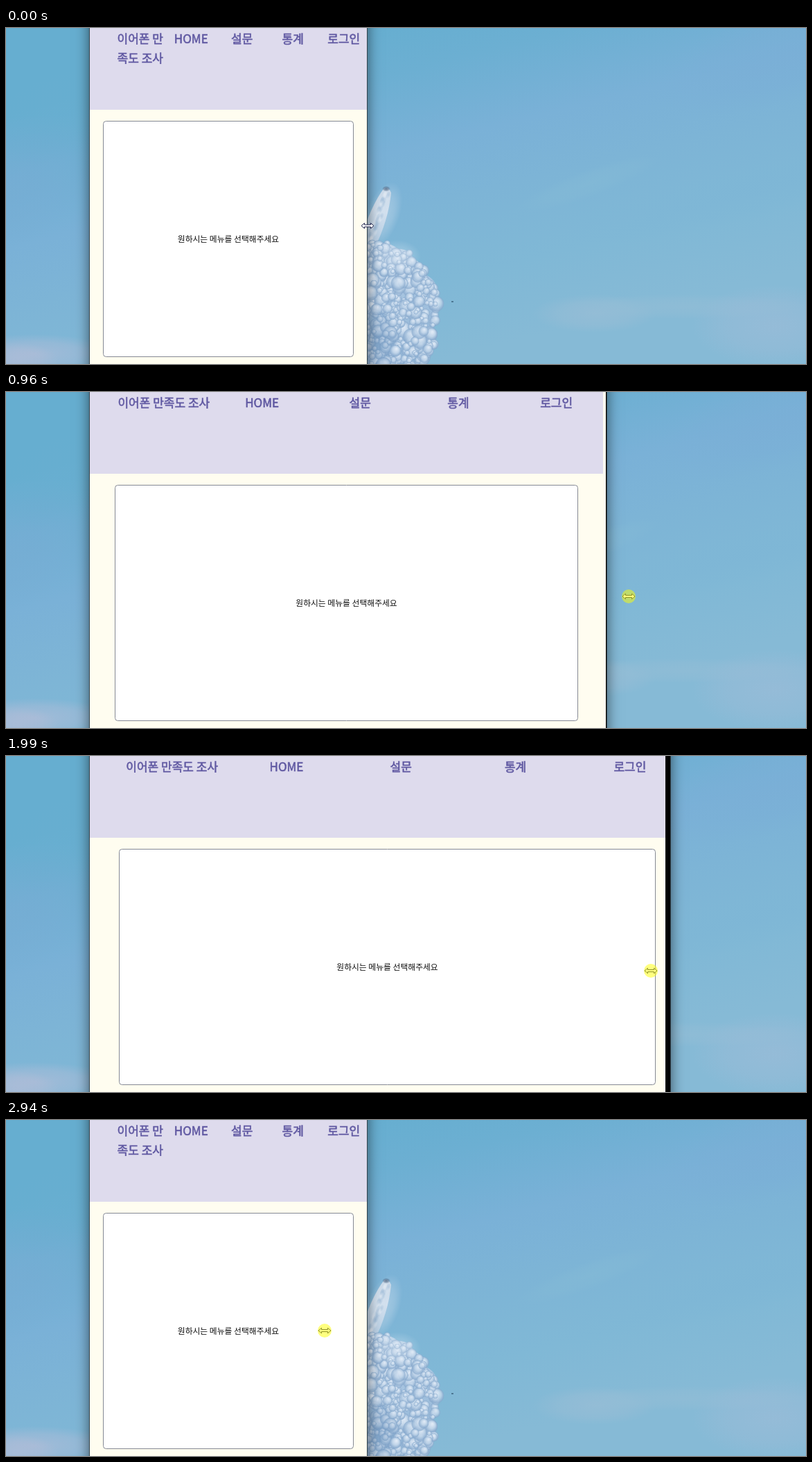
Recreate the animation shown at these times as an HTML page with a canvas. Size 1155x485 px, loop 3140 ms.

```html
<!DOCTYPE html>
<html lang="ko">
<head>
<meta charset="utf-8">
<title>Responsive window</title>
<style>
html, body { margin: 0; width: 100%; height: 100%; overflow: hidden; }
canvas { display: block; }
</style>
</head>
<body>
<canvas id="stage" width="1155" height="485"></canvas>
<script>
const WIDTH = 1155, HEIGHT = 485, LOOP = 3140, LEFT = 121;
const FONT = '"Noto Sans CJK KR", "Noto Sans KR", "Noto Sans CJK JP", "Noto Sans CJK", sans-serif';
const ctx = document.getElementById('stage').getContext('2d');

// time, pointer x, pointer y, window right, painted right, layout right
const KEYS = [
  [350, 524, 284, 523, 521, 521],
  [540, 597, 282, 580, 567, 562],
  [680, 696, 282, 677, 661, 655],
  [820, 778, 288, 757, 741, 733],
  [960, 899, 295, 868, 866, 862],
  [1170, 1015, 301, 1000, 992, 986],
  [1370, 1078, 305, 1059, 1057, 1054],
  [1580, 1100, 308, 1097, 1096, 1096],
  [1780, 1082, 309, 1090, 1082, 1096],
  [1990, 931, 310, 960, 952, 980],
  [2260, 722, 308, 738, 733, 761],
  [2460, 567, 306, 583, 580, 596],
  [2600, 503, 305, 522, 521, 521],
  [2800, 462, 304, 522, 521, 521],
  [2940, 460, 304, 522, 521, 521]
];
const REST = [0, 522, 285.5, 522, 521, 521];

// The screen refreshes in short steps: first time, last time, count
const TICKS = [0, 200, 350];
[[470, 820, 6], [890, 1370, 8], [1440, 1580, 3], [1780, 2260, 8], [2330, 2800, 8], [2870, 2940, 2]]
  .forEach(([from, to, count]) => {
    for (let i = 0; i < count; i++) {
      TICKS.push(Math.round((from + (to - from) * i / (count - 1)) / 10) * 10);
    }
  });

function poseAt(tick) {
  if (tick < 350) return REST;
  const next = KEYS.findIndex(key => key[0] > tick);
  if (next < 0) return KEYS[KEYS.length - 1];
  const a = KEYS[next - 1], b = KEYS[next];
  const part = (tick - a[0]) / (b[0] - a[0]);
  return a.map((value, i) => Math.round(value + (b[i] - value) * part));
}

function randomFrom(seed) {
  return () => (seed = (seed * 16807) % 2147483647) / 2147483647;
}

function fillGradient(g, gradient, stops) {
  stops.forEach(([at, color]) => gradient.addColorStop(at, color));
  g.fillStyle = gradient;
}

function softEllipse(g, x, y, rx, ry, rgb, alpha, angle = 0) {
  g.save();
  g.translate(x, y);
  g.rotate(angle);
  g.scale(rx, ry);
  fillGradient(g, g.createRadialGradient(0, 0, 0, 0, 0, 1), [
    [0, `rgba(${rgb},${alpha})`], [0.6, `rgba(${rgb},${alpha * 0.6})`], [1, `rgba(${rgb},0)`]
  ]);
  g.fillRect(-1, -1, 2, 2);
  g.restore();
}

function drawSky(g) {
  fillGradient(g, g.createLinearGradient(500, 0, 620, 480), [
    [0, '#66aed0'], [0.16, '#6cafd2'], [0.38, '#7ab1d7'], [0.55, '#7db4d6'], [0.78, '#80b8d6'], [1, '#86bad6']
  ]);
  g.fillRect(0, 0, WIDTH, HEIGHT);
  softEllipse(g, 0, 225, 150, 90, '122,172,212', 0.6, -0.4);
  softEllipse(g, 70, 130, 110, 60, '104,174,208', 0.5, -0.4);
  softEllipse(g, 1120, 40, 190, 70, '122,174,214', 0.6, -0.3);
  softEllipse(g, 1060, 235, 260, 45, '126,182,214', 0.5, -0.25);
  softEllipse(g, 840, 225, 110, 20, '132,186,214', 0.6, -0.35);
  softEllipse(g, 850, 412, 90, 28, '155,190,214', 0.65);
  softEllipse(g, 980, 402, 180, 18, '150,190,214', 0.5);
  softEllipse(g, 1110, 430, 120, 60, '155,188,216', 0.7);
  softEllipse(g, 40, 470, 120, 28, '170,188,216', 0.8);
  softEllipse(g, 15, 480, 60, 26, '184,190,216', 0.5);
}

function puff(g, x, y, r, alpha) {
  fillGradient(g, g.createRadialGradient(x + r * 0.2, y - r * 0.35, r * 0.1, x, y, r), [
    [0, `rgba(224,234,246,${alpha})`], [0.5, `rgba(190,211,232,${alpha})`],
    [0.88, `rgba(139,172,207,${alpha * 0.9})`], [1, 'rgba(126,160,198,0)']
  ]);
  g.beginPath();
  g.arc(x, y, r, 0, 7);
  g.fill();
}

function drawLaunch(g) {
  const random = randomFrom(77);
  softEllipse(g, 544, 270, 24, 50, '205,222,238', 0.5, 0.35);
  fillGradient(g, g.createLinearGradient(548, 230, 530, 315), [
    [0, '#cbd9e8'], [0.4, '#d3e1ef'], [1, '#b5cde3']
  ]);
  g.beginPath();
  g.moveTo(546, 231);
  g.quadraticCurveTo(530, 252, 517, 290);
  g.lineTo(517, 320);
  g.lineTo(532, 318);
  g.quadraticCurveTo(552, 278, 556, 238);
  g.quadraticCurveTo(552, 228, 546, 231);
  g.fill();
  for (let i = 0; i < 50; i++) {
    const p = random();
    softEllipse(g, 550 - p * 24 + random() * 8 - 4, 240 + p * 65, 3, 6,
      random() < 0.5 ? '235,241,248' : '150,182,213', 0.4, 0.4);
  }
  softEllipse(g, 549, 232, 6, 4, '75,100,130', 0.8);

  const blob = new Path2D('M505 320 L525 312 Q550 305 566 319 Q582 318 588 333 Q604 340 603 355 ' +
    'Q622 362 622 380 Q626 394 620 408 Q625 420 614 435 Q624 448 615 466 Q606 480 602 490 L505 490 Z');
  fillGradient(g, g.createLinearGradient(530, 310, 590, 485), [[0, '#bed3e8'], [0.6, '#9fbfdd'], [1, '#8fb2d3']]);
  g.fill(blob);
  for (let i = 0; i < 620; i++) {
    const x = 515 + random() * 108, y = 310 + random() * 180;
    if (g.isPointInPath(blob, x, y)) puff(g, x, y, 3.5 + random() * random() * 10, 0.85);
  }
  softEllipse(g, 535, 455, 36, 55, '90,132,178', 0.35);
  softEllipse(g, 565, 330, 34, 24, '235,242,250', 0.3);
  puff(g, 562, 466, 9, 1);
  g.fillStyle = '#4d7894';
  g.fillRect(643, 394, 3, 2);
}

const backdrop = document.createElement('canvas');
backdrop.width = WIDTH;
backdrop.height = HEIGHT;
const backdropCtx = backdrop.getContext('2d');
drawSky(backdropCtx);
drawLaunch(backdropCtx);

function wrap(text, limit) {
  const lines = [''];
  for (const char of text) {
    const last = lines.length - 1;
    if (ctx.measureText((lines[last] + char).trimEnd()).width <= limit) lines[last] += char;
    else lines.push(char);
  }
  return lines.map(line => line.trim());
}

function drawMenu(layoutWidth) {
  const column = (layoutWidth - 32.5) / 5;
  ctx.font = `17px ${FONT}`;
  ctx.fillStyle = ctx.strokeStyle = '#6059a2';
  ctx.lineWidth = 0.6;
  ['이어폰 만족도 조사', 'HOME', '설문', '통계', '로그인'].forEach((label, i) => {
    const x = LEFT + 36 + column * (i + 0.5);
    const lines = i ? [label] : wrap(label, column);
    lines.forEach((line, row) => {
      ctx.fillText(line, x, 22 + row * 28);
      ctx.strokeText(line, x, 22 + row * 28);
    });
  });
}

function drawCard(layoutWidth) {
  const margin = layoutWidth * 0.05;
  const x = Math.round(LEFT + margin - 1) + 0.5;
  const right = Math.round(LEFT + layoutWidth - margin) + 0.5;
  ctx.beginPath();
  ctx.roundRect(x, 134.5, right - x, 340, 4);
  ctx.fillStyle = '#fff';
  ctx.fill();
  ctx.strokeStyle = '#858994';
  ctx.lineWidth = 1;
  ctx.stroke();
  ctx.font = `11.8px ${FONT}`;
  ctx.fillStyle = '#111';
  ctx.fillText('원하시는 메뉴를 선택해주세요', LEFT + layoutWidth / 2, 309);
}

function drawWindow(right, painted, layout) {
  ctx.save();
  ctx.shadowColor = 'rgba(0,0,0,.55)';
  ctx.shadowBlur = 18;
  ctx.shadowOffsetY = 2;
  ctx.fillStyle = '#34454f';
  ctx.fillRect(LEFT - 1, -40, right - LEFT + 1, HEIGHT + 80);
  ctx.restore();
  ctx.fillStyle = '#000';
  ctx.fillRect(LEFT, 0, right - LEFT - 1, HEIGHT);

  ctx.save();
  ctx.beginPath();
  ctx.rect(LEFT, 0, painted - LEFT, HEIGHT);
  ctx.clip();
  ctx.fillStyle = '#fffdf0';
  ctx.fillRect(LEFT, 0, painted - LEFT, HEIGHT);
  ctx.fillStyle = '#dedbed';
  ctx.fillRect(LEFT, 0, layout - LEFT, 118);
  ctx.textAlign = 'center';
  drawMenu(layout - LEFT);
  drawCard(layout - LEFT);
  ctx.restore();
}

function drawPointer(x, y, highlighted) {
  ctx.save();
  ctx.translate(x, y);
  ctx.beginPath();
  for (const side of [-1, 1]) {
    ctx.lineTo(side * 4.5, side * 1.5);
    ctx.lineTo(side * 4.5, side * 3.8);
    ctx.lineTo(side * 9, 0);
    ctx.lineTo(side * 4.5, side * -3.8);
    ctx.lineTo(side * 4.5, side * -1.5);
  }
  ctx.closePath();
  ctx.fillStyle = '#fff';
  ctx.fill();
  ctx.strokeStyle = '#20244c';
  ctx.lineWidth = 1;
  ctx.stroke();
  if (highlighted) {
    ctx.fillStyle = 'rgba(255,255,0,.5)';
    ctx.beginPath();
    ctx.arc(0, 0, 10, 0, 7);
    ctx.fill();
  }
  ctx.restore();
}

function draw(now) {
  const time = now % LOOP;
  const tick = TICKS.filter(at => at <= time).pop();
  const [, x, y, right, painted, layout] = poseAt(tick);
  ctx.drawImage(backdrop, 0, 0);
  drawWindow(right, painted, layout);
  if (tick !== 200) drawPointer(x, y, tick > 200);
}

const start = performance.now();
function loop() {
  draw(performance.now() - start);
  requestAnimationFrame(loop);
}
loop();
</script>
</body>
</html>
```
